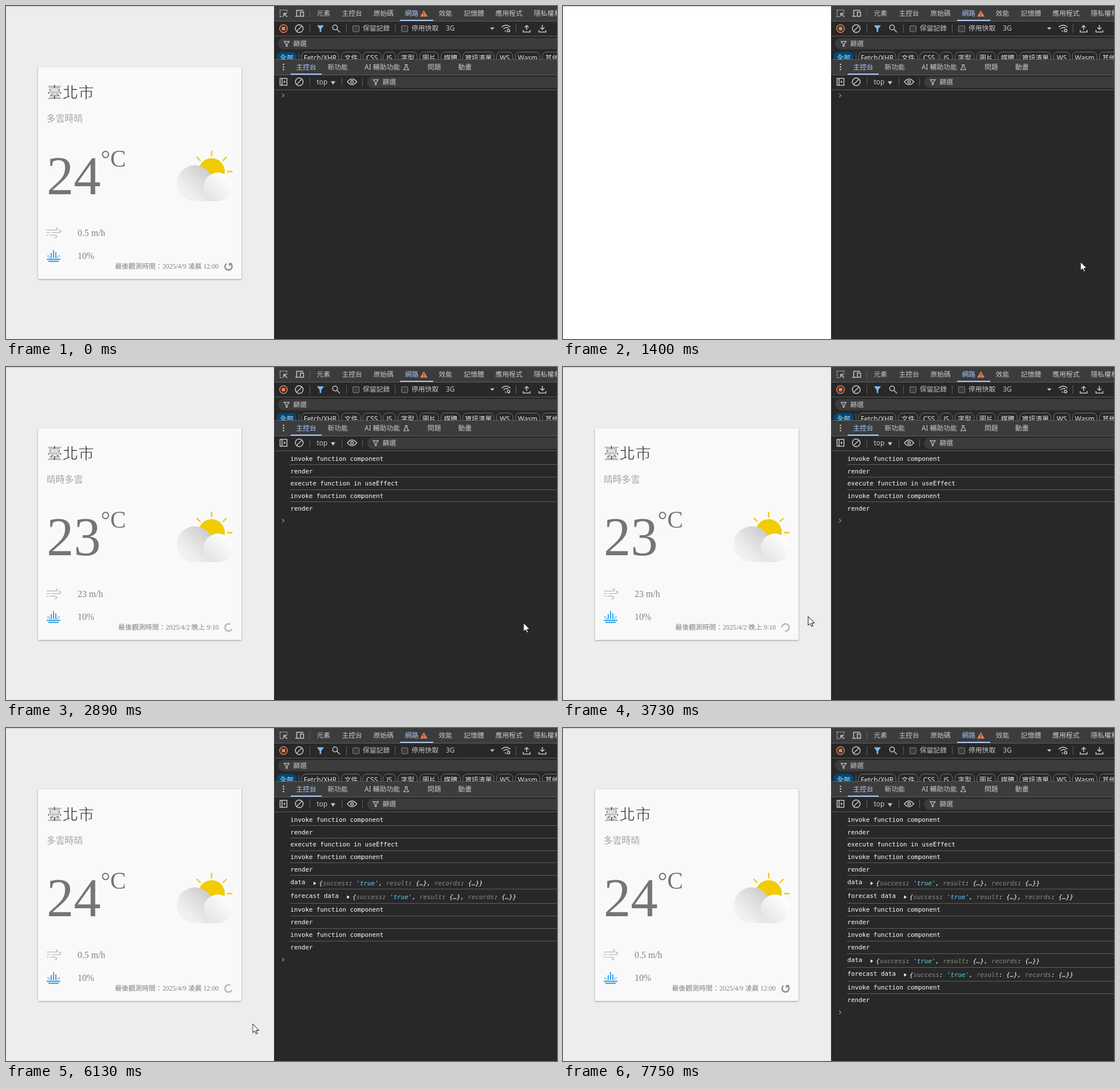
An HTML page that plays this animation: 962 px wide and 582 px high, repeating every 8280 ms.

```html
<!DOCTYPE html>
<html lang="zh-Hant">
<head>
<meta charset="utf-8">
<title>Weather card and console</title>
<style>
html, body { margin: 0; width: 100%; height: 100%; overflow: hidden; background: #fff; }
svg { display: block; }
.ui { font: 11.8px "Noto Sans", "Noto Sans CJK TC", "Noto Sans CJK", sans-serif; fill: #c9c9c9; }
.card { font: 15.8px "Liberation Serif", "Noto Sans CJK TC", "Noto Sans CJK", serif; fill: #828282; }
/* a stroke in the card colour thins the glyphs to a light weight */
.card .cjk { font-family: "Noto Sans CJK TC", "Noto Sans CJK", sans-serif; font-weight: 300; stroke: #f9f9f9; stroke-width: .3px; }
.card .city { font-size: 27.6px; fill: #212121; stroke-width: .8px; }
.small { font-size: 11.83px; text-anchor: end; }
.big { font-size: 94.7px; fill: #757575; }
.unit { font-size: 41.4px; fill: #757575; }
.log { font: 10.8px "DejaVu Sans Mono", "Noto Sans Mono", monospace; fill: #fff; }
.obj { font-style: italic; }
.key { fill: #8b8b8b; }
.str { fill: #5cd5fb; }
.blue { fill: #a8c7fa; }
.line { fill: none; stroke: #c7c7c7; stroke-width: 1.5; }
.rule { stroke: #5e5e5e; }
.chip { fill: none; stroke: #757575; }

/* one loop: 8280 ms */
.page, .old, .new, .idle, .busy, .l1, .l2, .l3, .l4, .l5, .prompt, .pointer, .arrow, .hand {
  animation: 8.28s step-end infinite;
}
.page { animation-name: page; }
.old { animation-name: old; }
.new { animation-name: new; }
.idle { animation-name: idle; }
.busy { animation-name: busy; }
.l1 { animation-name: l1; }
.l2 { animation-name: l2; }
.l3 { animation-name: l3; }
.l4 { animation-name: l4; }
.l5 { animation-name: l5; }
.prompt { animation-name: prompt; }
.pointer { animation-name: pointer; }
.arrow { animation-name: arrow; }
.hand { animation-name: hand; }
.spin { animation: spin 8.28s linear infinite; }
.move { animation: move 8.28s linear infinite; }

@keyframes page { 0%, 20.048%, 100% { opacity: 1 } 1.57% { opacity: 0 } }
@keyframes old { 0%, 46.739%, 100% { opacity: 0 } 20.048% { opacity: 1 } }
@keyframes new { 0%, 46.739%, 100% { opacity: 1 } 20.048% { opacity: 0 } }
@keyframes idle { 0%, 46.739%, 87.802%, 100% { opacity: 1 } 20.048%, 59.179% { opacity: 0 } }
@keyframes busy { 0%, 46.739%, 87.802%, 100% { opacity: 0 } 20.048%, 59.179% { opacity: 1 } }
@keyframes l1 { 0% { opacity: 0 } 20.048%, 100% { opacity: 1 } }
@keyframes l2 { 0% { opacity: 0 } 20.894%, 100% { opacity: 1 } }
@keyframes l3 { 0% { opacity: 0 } 46.739%, 100% { opacity: 1 } }
@keyframes l4 { 0% { opacity: 0 } 59.179%, 100% { opacity: 1 } }
@keyframes l5 { 0% { opacity: 0 } 87.802%, 100% { opacity: 1 } }
@keyframes prompt {
  0% { transform: translateY(156.5px) }
  20.048% { transform: translateY(203.5px) }
  20.894% { transform: translateY(268.5px) }
  46.739% { transform: translateY(361.5px) }
  59.179% { transform: translateY(405px) }
  87.802%, 100% { transform: translateY(497px) }
}
/* counter-clockwise, 1.5 s a turn */
@keyframes spin {
  0%, 20.048% { transform: rotate(8deg) }
  46.739% { transform: rotate(-522.4deg) }
  46.74%, 59.179% { transform: rotate(8deg) }
  87.802%, 100% { transform: rotate(-560.8deg) }
}
@keyframes pointer { 0%, 93.599%, 100% { opacity: 0 } 13.647% { opacity: 1 } }
@keyframes arrow { 0%, 62.4%, 100% { opacity: 1 } 53.1% { opacity: 0 } }
@keyframes hand { 0%, 62.4%, 100% { opacity: 0 } 53.1% { opacity: 1 } }
@keyframes move {
  0%, 13.3% { transform: translate(957px, 580px); animation-timing-function: ease-out }
  16.8%, 36.5% { transform: translate(903.5px, 447px) }
  40.1% { transform: translate(560px, 409px); animation-timing-function: ease-out }
  42.5%, 50.3% { transform: translate(428px, 436px) }
  53.3% { transform: translate(380px, 453px) }
  54.1%, 61.5% { transform: translate(386px, 450.5px); animation-timing-function: ease-out }
  65%, 89.8% { transform: translate(430.5px, 517px) }
  91.1% { transform: translate(560px, 493px) }
  92.8% { transform: translate(847px, 555px) }
  93.6%, 100% { transform: translate(880px, 580px) }
}
</style>
</head>
<body>
<svg width="962" height="582" viewBox="0 0 962 582">
  <defs>
    <linearGradient id="cloud" gradientUnits="userSpaceOnUse" x1="349" y1="284" x2="313" y2="320">
      <stop offset="0" stop-color="#cdcdcd"/><stop offset="1" stop-color="#f0f0f0"/>
    </linearGradient>
    <linearGradient id="puff" gradientUnits="userSpaceOnUse" x1="386" y1="301" x2="354" y2="332">
      <stop offset="0" stop-color="#fdfdfd"/><stop offset="1" stop-color="#e6e6e6"/>
    </linearGradient>
    <filter id="shadow" x="-5%" y="-5%" width="110%" height="110%">
      <feDropShadow dx="0" dy="1" stdDeviation="1.5" flood-color="#999"/>
    </filter>
    <clipPath id="chips"><path d="M469 79H962V93H469Z"/></clipPath>
    <path id="funnel" d="M-4.5-4.2H4.5L1 .5V4.5H-1V.5Z"/>
    <g id="clear" class="line"><circle r="6.8"/><path d="M-4.8 4.8 4.8-4.8"/></g>
  </defs>

  <g class="page">
    <path d="M0 0H468V582H0Z" fill="#ededed"/>
    <path d="M56 107H411V477H56Z" fill="#f9f9f9" filter="url(#shadow)"/>
    <g class="card">
      <text class="cjk city" x="71" y="161">臺北市</text>
      <text class="unit" x="165.5" y="280.5">°C</text>
      <text x="125" y="442">10%</text>
      <g class="old">
        <text class="cjk" x="71" y="202">晴時多雲</text>
        <text class="big" x="71" y="328.7">23</text>
        <text x="125" y="402">23 m/h</text>
        <text class="small" x="371.5" y="459">最後觀測時間：2025/4/2 晚上 9:10</text>
      </g>
      <g class="new">
        <text class="cjk" x="71" y="202">多雲時晴</text>
        <text class="big" x="71" y="328.7">24</text>
        <text x="125" y="402">0.5 m/h</text>
        <text class="small" x="371.5" y="459">最後觀測時間：2025/4/9 凌晨 12:00</text>
      </g>
    </g>

    <!-- sun and clouds -->
    <circle cx="359" cy="289" r="23" fill="#f0cc00"/>
    <path d="M359 254V261.5M333.5 264.5 339 270M384.5 264.5 379 270M387 289.5H394.5" stroke="#f0c818" stroke-width="2.4" stroke-linecap="round"/>
    <path d="M329.5 278.5A31.2 31.2 0 0 0 329.5 341H370V316H360.7A31.2 31.2 0 0 0 329.5 278.5Z" fill="url(#cloud)"/>
    <circle cx="370" cy="316" r="25" fill="url(#puff)"/>

    <!-- wind -->
    <path d="M71 391.5H86.5q3.5 0 3.5-2t-3.5-1.7M71 396H77M79.5 396H92q3.5 0 3.5-2.2t-3.5-1.8M71 400.5H74M76.5 400.5H85q3.5 0 3.5 2.4t-3.5 2.1" fill="none" stroke="#a8a8a8" stroke-width="1.2"/>

    <!-- rain -->
    <g fill="none" stroke="#2a9fe8" stroke-width="1.9">
      <path d="M83 426.5V440.5M79 432V440.5M87 430.5V440.5M71 442.8H95M74 446.3H92"/>
      <path d="M72.5 437H74.5M75.5 439.5H77M91.5 437H93.5M89 439.5H90.5"/>
    </g>

    <g transform="translate(388.5 455.2)">
      <g class="idle">
        <path d="M-3.6-4.9A6.1 6.1 0 1 0 4.6-4" fill="none" stroke="#828282" stroke-width="2.4"/>
        <path d="M.9-6H6.8L.9-.3Z" fill="#828282"/>
      </g>
      <g class="busy">
        <path class="spin" d="M-4.2-4.7A6.3 6.3 0 1 0 4.2-4.7" fill="none" stroke="#b6b6b6" stroke-width="2.5"/>
      </g>
    </g>
  </g>
  <path d="M0 .5H468" stroke="#c4c4c4"/>

  <!-- developer tools -->
  <path d="M468 0H962V582H468Z" fill="#282828"/>
  <path d="M468 0H962V26H468ZM468 94H962V120H468ZM970 56H484.5a9.7 9.7 0 0 0 0 19.4H970ZM970 123.5H640a9.7 9.7 0 0 0 0 19.4H970Z" fill="#3c3c3c"/>
  <path class="rule" d="M469 26.5H962M469 52.5H962M469 93.5H962M469 120.5H962M469 146.5H962"/>
  <path class="rule" d="M530.5 6V20M530.5 32V47M594.5 32V47M679.5 32V47M890.5 32V47M530.5 126V140M586.5 126V140M622.5 126V140"/>
  <path d="M688 24H746V26H688ZM497 118H551V120H497Z" fill="#a8c7fa"/>

  <g class="ui">
    <text x="542.5" y="17">元素</text>
    <text x="586.5" y="17">主控台</text>
    <text x="641.5" y="17">原始碼</text>
    <text class="blue" x="696.5" y="17">網路</text>
    <text x="755.5" y="17">效能</text>
    <text x="799.5" y="17">記憶體</text>
    <text x="854.5" y="17">應用程式</text>
    <text x="921.5" y="17">隱私權和</text>
    <text x="623" y="43">保留記錄</text>
    <text x="708" y="43">停用快取</text>
    <text x="768" y="43">3G</text>
    <text x="501.5" y="70">篩選</text>
    <text class="blue" x="506.5" y="111">主控台</text>
    <text x="561.5" y="111">新功能</text>
    <text x="626" y="111">AI 輔助功能</text>
    <text x="736" y="111">問題</text>
    <text x="789.5" y="111">動畫</text>
    <text x="542.5" y="137">top</text>
    <text x="657.5" y="137">篩選</text>
  </g>
  <g class="ui" id="types" clip-path="url(#chips)" text-anchor="middle"><path class="rule" d="M511.5 82V98"/></g>

  <!-- toolbar icons -->
  <path class="line" d="M478 7H491M478.5 8V19M490.5 7V11M479 18.5H484" stroke-dasharray="1.5 1.6"/>
  <path class="line" d="M491 19 485.5 13.5M485 18V13H490.5"/>
  <path class="line" d="M519 7.5H507.5V17M505 18H512.5M514 10.5H519.5V18H514Z"/>
  <path d="M729.5 7.5 736 18.5H723Z" fill="#e8804c"/>
  <path d="M729.5 11.5V15M729.5 16V17.3" stroke="#3c3c3c" stroke-width="1.3"/>
  <circle cx="484.5" cy="39.5" r="6.7" fill="none" stroke="#e8845a" stroke-width="1.5"/>
  <path d="M481.5 36.5H487.5V42.5H481.5Z" fill="#e8845a"/>
  <use href="#clear" x="512" y="39.5"/>
  <use href="#clear" x="512" y="132.5"/>
  <use href="#funnel" transform="translate(549 39.5) scale(1.35)" fill="#7cb8f8"/>
  <g fill="none" stroke="#c7c7c7" stroke-width="1.2">
    <use href="#funnel" x="490" y="66"/>
    <use href="#funnel" x="645.5" y="133"/>
  </g>
  <g fill="#3b3b3b" stroke="#858585">
    <rect x="605.5" y="34.5" width="11" height="10.5" rx="1.5"/>
    <rect x="690.5" y="34.5" width="11" height="10.5" rx="1.5"/>
  </g>
  <g class="line">
    <circle cx="574.5" cy="37.5" r="4.2"/><path d="M577.5 40.5 583 46"/>
    <path d="M865.5 37Q873 30 880.5 37M868.5 40Q873 36 877 38.5M871 43 873 45"/>
    <circle cx="877.5" cy="43" r="2.2"/>
    <path d="M909 42V34M905.5 37.5 909 34 912.5 37.5M903 42V45.5H915V42"/>
    <path d="M936.5 33V41M933 37.5 936.5 41 940 37.5M930.5 42V45.5H942.5V42"/>
    <path d="M696 102.5H701.5M697.5 102.5V106L694.5 111.5H703L700 106V102.5" stroke-width="1.2"/>
    <path d="M478.5 126.5H490.5V138.5H478.5ZM482 126.5V138.5"/>
    <path d="M596 132.5Q604 122.5 612.5 132.5Q604 142.5 596 132.5Z"/><circle cx="604.2" cy="132.5" r="2.3"/>
  </g>
  <path d="M845 37.5H853L849 41.5ZM567 131.5H575L571 137.5ZM485 130 488.5 132.5 485 135Z" fill="#c7c7c7"/>
  <g fill="#d0d0d0"><circle cx="484.5" cy="102" r="1.3"/><circle cx="484.5" cy="106.5" r="1.3"/><circle cx="484.5" cy="111" r="1.3"/></g>

  <g class="log" id="logs"></g>
  <path class="prompt" d="M482-3 485.5 0 482 3" fill="none" stroke="#7896da" stroke-width="1.2"/>

  <g class="pointer"><g class="move" fill="#fff" stroke="#000" stroke-linejoin="round">
    <path class="arrow" d="M0 0V15.5L3.6 12.2 6 17.7 8.4 16.6 6.1 11.4H11Z"/>
    <path class="hand" d="M-2 13V1.5a1.6 1.6 0 0 1 3.2 0V8a1.5 1.5 0 0 1 2.8 .4a1.5 1.5 0 0 1 2.6 .6a1.4 1.4 0 0 1 2.3 1.2V15q0 3-2 6H-1.5q-1.5-3-5.5-7.5q-1.3-2 .4-2.6q2-.4 4.6 2.1Z"/>
  </g></g>
</svg>

<script>
const add = (id, html) => document.getElementById(id).insertAdjacentHTML('beforeend', html);

// resource type chips: left edge, right edge, label
[[473, 507, '全部'], [516, 581, 'Fetch/XHR'], [586, 619, '文件'], [623, 655, 'CSS'], [658.5, 680, 'JS'],
 [684.5, 718, '字型'], [722.5, 755, '圖片'], [759.5, 793, '媒體'], [797.5, 852, '資訊清單'],
 [856.5, 885, 'WS'], [889.5, 932, 'Wasm'], [936.5, 970, '其他']].forEach(([a, b, label], i) => {
  const style = i ? 'class="chip"' : 'fill="#004a77"';
  add('types', `<rect x="${a}" y="80.5" width="${b - a}" height="19" rx="7" ${style}/>
    <text x="${(a + b) / 2}" y="95" fill="${i ? '#e3e3e3' : '#c2e7ff'}">${label}</text>`);
});

const key = name => `<tspan class="key">${name}</tspan>: `;
const preview = `{${key('success')}<tspan class="str">'true'</tspan>, ${key('result')}{…}, ${key('records')}{…}}`;
const call = 'invoke function component', done = 'render';

// console rows: step, baseline, rule above, label, preview position
[['l1', 164, 0, call], ['l1', 186, 170.5, done],
 ['l2', 207, 192.5, 'execute function in useEffect'], ['l2', 229, 214.5, call], ['l2', 251, 235.5, done],
 ['l3', 273, 257.5, 'data', 547], ['l3', 297, 281.5, 'forecast data', 605.5],
 ['l3', 321, 306.5, call], ['l3', 343, 328.5, done],
 ['l4', 365, 350.5, call], ['l4', 387, 372.5, done],
 ['l5', 409, 394.5, 'data', 547], ['l5', 433, 418.5, 'forecast data', 605.5],
 ['l5', 457, 442.5, call], ['l5', 479, 464.5, done]].forEach(([step, y, rule, label, x]) => {
  const line = rule ? `<path class="rule" d="M496 ${rule}H962"/>` : '';
  const object = x ? `<path d="M${x - 10} ${y - 4.5}l4.5 3-4.5 3Z"/><text class="obj" x="${x - 0.5}" y="${y + 2}">${preview}</text>` : '';
  add('logs', `<g class="${step}">${line}<text x="496.5" y="${y}">${label}</text>${object}</g>`);
});
</script>
</body>
</html>
```
